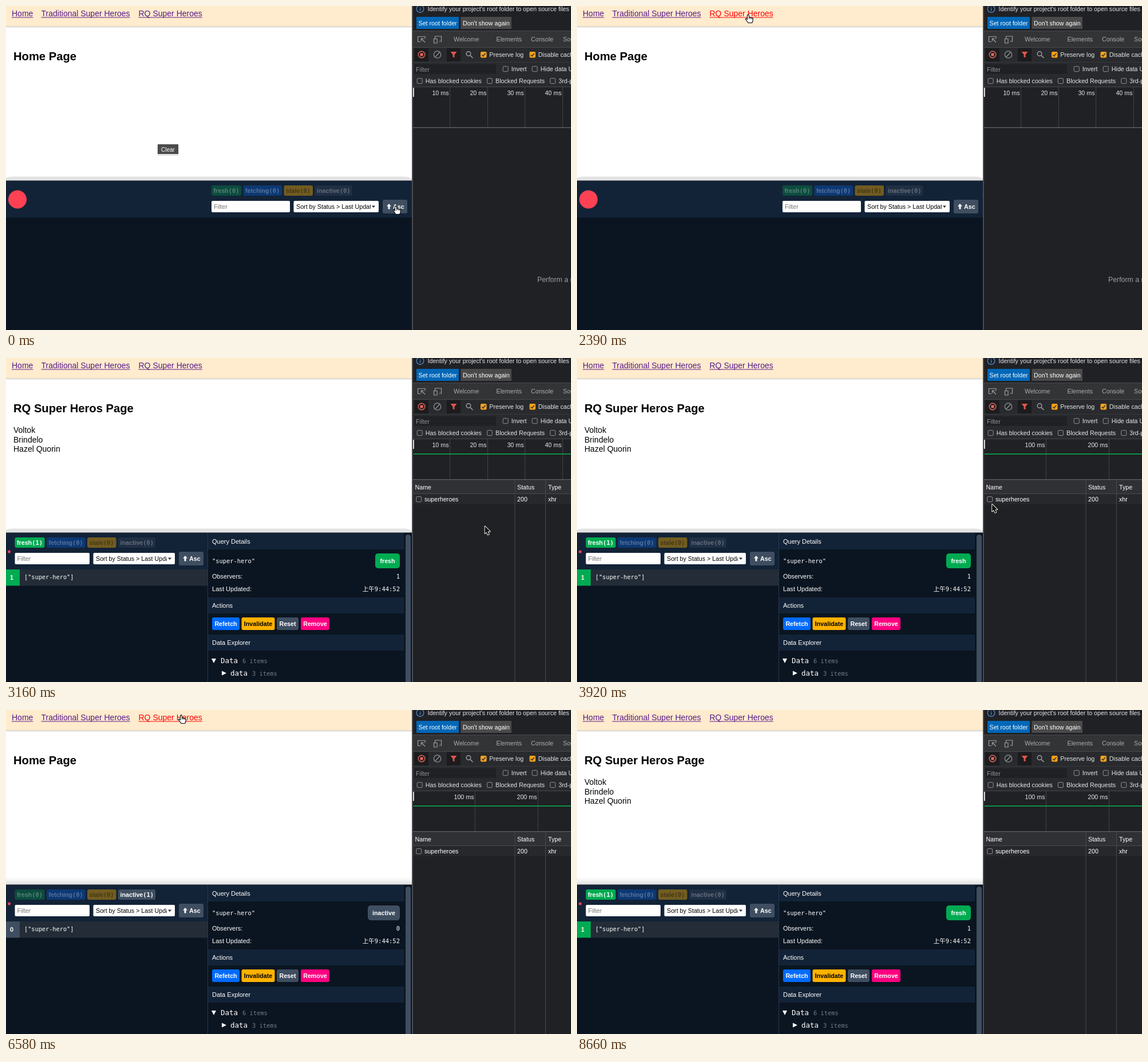
Animation of 987 by 567 pixels, one loop 9 s. Source, as an HTML page with a canvas:

```html
<!DOCTYPE html>
<html lang="en">
<head>
<meta charset="utf-8">
<title>Query cache demo</title>
<style>
html, body { margin: 0; width: 100%; height: 100%; overflow: hidden; background: #fff; }
canvas { display: block; width: 987px; height: 567px; }
</style>
</head>
<body>
<canvas id="stage"></canvas>
<script>
const W = 987, H = 567, LOOP = 9000;
const canvas = document.getElementById('stage');
const ctx = canvas.getContext('2d');
const dpr = window.devicePixelRatio || 1;
canvas.width = W * dpr;
canvas.height = H * dpr;

const SANS = '"Liberation Sans", Arial, sans-serif';
const MONO = '"DejaVu Sans Mono", "Noto Sans CJK TC", "Noto Sans CJK SC", "Noto Sans CJK", monospace';
const C = {
  navy: '#132337', night: '#0b1521', slate: '#3f4e60', green: '#00ab52',
  blue: '#006bff', amber: '#ffb200', pink: '#ff0080', red: '#ff4154',
  link: '#551a8b', base: '#202124', bar: '#292a2d', line: '#47494d', pale: '#e3e5e8', dim: '#9aa0a6'
};
const heroes = ['Voltok', 'Brindelo', 'Hazel Quorin'];

const ARROW = new Path2D('M0 0V12.6L2.8 10L5 14.9L7.2 14L5.1 9.2H9.2Z');
const HAND = new Path2D('M-1.5 1.2Q0 -.9 1.4 1.2L1.6 5Q3 4 4.2 5.4Q5.6 4.8 6.6 6.2Q8.2 5.8 8.4 7.6' +
  'L8.2 10.5L6.8 14.5H0L-2 11.5L-4.6 8.2Q-4.6 6 -2.6 7.4L-1.5 8.4Z');

// Pointer moves: start, end, steps, then the points of the path.
const moves = [
  [80, 170, 2, 781, 417],
  [380, 560, 4, 803, 400, 775, 290, 642, 188],
  [830, 1210, 7, 470, 110, 303, 34],
  [1750, 2100, 7, 306, 33, 299, 15],
  [2540, 2860, 5, 400, 90, 842, 293],
  [3160, 4040, 15, 815, 300, 745, 268, 712, 248],
  [4100, 4280, 4, 750, 190, 791, 197],
  [4520, 4690, 4, 400, 100, 17, 49],
  [4960, 5140, 4, 17, 20],
  [5280, 5340, 2, 19, 17],
  [5730, 6340, 11, 60, 32, 200, 36, 314, 30, 306, 9],
  [6840, 6990, 3, 860, 308],
  [7230, 7950, 12, 879, 314, 735, 252, 721, 257.5, 713, 144, 727, 262],
  [8100, 8330, 4, 936, 527],
  [8540, 8660, 3, 955, 576]
];
const handTimes = [[0, 80], [1980, 2540], [5020, 5790], [6280, 6840]];
const within = (t, a, b) => t >= a && t < b;

function pointer(t) {
  let at = [681, 350];
  for (const [t0, t1, steps, ...xy] of moves) {
    if (t < t0) break;
    const pts = [at];
    for (let i = 0; i < xy.length; i += 2) pts.push([xy[i], xy[i + 1]]);
    const k = Math.min(steps, Math.floor((t - t0) / (t1 - t0) * (steps - 1)) + 1);
    const u = k / steps * (pts.length - 1);
    const i = Math.min(Math.floor(u), pts.length - 2);
    at = [0, 1].map(n => pts[i][n] + (pts[i + 1][n] - pts[i][n]) * (u - i));
  }
  return at;
}

function rect(x, y, w, h, fill, r = 0) {
  ctx.fillStyle = fill;
  if (!r) return ctx.fillRect(x, y, w, h);
  ctx.beginPath();
  ctx.roundRect(x, y, w, h, r);
  ctx.fill();
}

function text(s, x, y, fill = '#fff', size = 10.7, { bold, mono, align = 'left' } = {}) {
  ctx.font = `${bold ? 'bold ' : ''}${size}px ${mono ? MONO : SANS}`;
  ctx.textAlign = align;
  ctx.fillStyle = fill;
  ctx.fillText(s, x, y);
  return ctx.measureText(s).width;
}

function stroke(path, color, width = 1.2) {
  ctx.strokeStyle = color;
  ctx.lineWidth = width;
  ctx.stroke(typeof path === 'string' ? new Path2D(path) : path);
}

function shape(path, fill) {
  ctx.fillStyle = fill;
  ctx.fill(new Path2D(path));
}

function dot(x, y, r, fill) {
  ctx.beginPath();
  ctx.arc(x, y, r, 0, 7);
  ctx.fillStyle = fill;
  ctx.fill();
}

function ring(x, y, r, color, width) {
  const p = new Path2D();
  p.arc(x, y, r, 0, 7);
  stroke(p, color, width);
}

function button(label, x, y, w, h, fill, color = '#fff', r = 3) {
  rect(x, y, w, h, fill, r);
  text(label, x + w / 2, y + h / 2 + 4, color, 10.7, { bold: true, align: 'center' });
}

function clipped(x, y, w, h, draw) {
  ctx.save();
  ctx.beginPath();
  ctx.rect(x, y, w, h);
  ctx.clip();
  draw();
  ctx.restore();
}

function link(label, x, hot) {
  const color = hot ? '#ff0000' : C.link;
  const w = text(label, x, 18, color, 14);
  rect(x, 19.5, w, 1, color);
}

function page(s) {
  rect(0, 0, 709, 306, '#fff');
  rect(0, 0, 709, 36, '#ffebcd');
  rect(0, 35.5, 709, 1.5, '#d6d3d0');
  rect(0, 37, 709, 1, '#f3f3f3');
  link('Home', 10, s.homeHot);
  link('Traditional Super Heroes', 61.5, false);
  link('RQ Super Heroes', 231.5, s.rqHot);
  const title = s.loading ? 'Loading...' : s.list ? 'RQ Super Heros Page' : 'Home Page';
  text(title, 13, 95, '#000', 20.2, { bold: true });
  if (s.list) heroes.forEach((h, i) => text(h, 13, 131 + i * 16.5, '#000', 14));

  if (s.soft) {
    const g = ctx.createLinearGradient(0, 293, 0, 306);
    g.addColorStop(0, '#fff');
    g.addColorStop(1, '#dedede');
    rect(0, 293, 709, 13, g);
  } else {
    shape('M0 301Q4 298.5 12 298.5H697Q705 299 709 303V306H0Z', '#e3e3e3');
  }
  if (s.tip) {
    rect(264, 243, 38, 19, '#e4e4e4', 3);
    rect(265, 242, 36, 17, '#4b4b4b');
    text('Clear', 283, 254.5, '#fff', 10, { align: 'center' });
  }
}

function tag(name, count, x, w, fill, color) {
  ctx.globalAlpha = count ? 1 : name === 'stale' ? 0.4 : 0.3;
  rect(x, 314, w, 18, fill, 3);
  const tw = text(name, x + 3.5, 326.5, color, 10.7, { bold: true });
  text(`(${count})`, x + 3.5 + tw, 326.5, color, 10.4, { bold: true, mono: true });
  ctx.globalAlpha = 1;
}

function toolbar(s) {
  const left = s.open ? 15.5 : 359;
  const is = name => s.status === name ? 1 : 0;
  tag('fresh', is('fresh'), left, 52, C.green, '#fff');
  tag('fetching', is('fetching'), left + 55.5, 67.5, C.blue, '#fff');
  tag('stale', 0, left + 126.5, 50.5, C.amber, '#000');
  tag('inactive', is('inactive'), left + 180.5, 65, C.slate, '#fff');

  const fw = s.open ? 130.5 : 137;
  const sx = s.open ? 152.5 : 502.5, sw = s.open ? 142.5 : 148.5;
  rect(left, 341, fw, 20, '#fff', 2);
  text('Filter', left + 4, 355, '#757575');
  rect(sx, 341, sw, 20, '#fff', 2);
  clipped(sx, 341, sw - 14, 20, () => text('Sort by Status > Last Updated', sx + 4.5, 355, '#000'));
  const ax = sx + sw - 12;
  shape(`M${ax} 349.5h6l-3 3.5z`, '#222');

  const bx = s.open ? 302 : 658;
  rect(bx, 339, 43, 24, C.slate, 3);
  shape(`M${bx + 11} 346l4 4.5h-2.5v5h-3v-5h-2.5z`, '#fff');
  text('Asc', bx + 18, 355, '#fff', 10.7, { bold: true });
}

function details(s) {
  const hue = { fresh: C.green, fetching: C.blue, inactive: C.slate }[s.status];
  const count = s.status === 'inactive' ? '0' : '1';
  const mono = { mono: true }, right = { mono: true, align: 'right' };

  rect(24, 370, 328, 28.5, '#232c37');
  rect(0, 370, 24, 28.5, hue);
  text(count, 10, 388, '#fff', 10.7, { bold: true, align: 'center' });
  text('["super-hero"]', 32, 387, '#fff', 10.25, mono);

  rect(352, 306, 357, 261, C.night);
  rect(352, 306, 1, 261, '#26384d');
  [['Query Details', 306], ['Actions', 419], ['Data Explorer', 484]].forEach(([label, y]) => {
    rect(353, y, 342, y === 306 ? 29 : 28, C.navy);
    text(label, 360, y + (y === 306 ? 19 : 18), '#fff', 11);
  });
  rect(698, 309, 9, 270, C.slate, 4.5);

  text('"super-hero"', 360, 358.5, '#fff', 10.4, mono);
  const bw = s.status === 'fresh' ? 43 : 56;
  button(s.status, 688 - bw, 342, bw, 26, hue, '#fff', 5);
  text('Observers:', 360, 386, '#fff', 10.9);
  text(count, 688, 386, '#fff', 10.4, right);
  text('Last Updated:', 360, 408, '#fff', 11.1);
  text(s.loading ? '上午8:00:00' : '上午9:44:52', 688, 408, '#fff', 10.5, right);

  button('Refetch', 360, 454, 48, 22, C.blue);
  button('Invalidate', 411.5, 454, 58, 22, C.amber, '#000');
  button('Reset', 473, 454, 38, 22, C.slate);
  button('Remove', 515, 454, 50, 22, C.pink);

  if (s.loading) {
    text('Data', 360, 534, '#fff', 12.5, mono);
    return;
  }
  shape('M359 526h8l-4 8z', '#fff');
  text('Data', 375, 534, '#fff', 12.5, mono);
  text('6 items', 413, 534, '#737a82', 10.4, mono);
  shape('M377 547.5l8 4l-8 4z', '#fff');
  text('data', 392, 556, '#fff', 12.5, mono);
  text('3 items', 430, 556, '#737a82', 10.4, mono);
}

function queryPanel(s) {
  rect(0, 305.5, 709, 262, C.night);
  rect(0, 306, 709, 64, C.navy);
  if (s.open) dot(5.5, 339, 2.5, C.red);
  else dot(20, 338.5, 16, C.red);
  toolbar(s);
  if (s.open) details(s);
}

function checkbox(x, y, label, on) {
  if (on) {
    rect(x, y, 10.5, 10.5, '#ffa31a', 2);
    stroke(`M${x + 2.3} ${y + 5.4}l2.2 2.4l3.8 -5`, '#333', 1.5);
  } else {
    ctx.beginPath();
    ctx.roundRect(x + 0.7, y + 0.7, 9, 9, 1.5);
    ctx.strokeStyle = '#8f9296';
    ctx.lineWidth = 1;
    ctx.stroke();
  }
  text(label, x + 15.3, y + 9, C.pale);
}

function devtools(s) {
  rect(709, 0, 278, H, C.base);
  ring(723.5, 5, 6.3, '#4b8fe0', 1.2);
  rect(723, 4, 1.2, 4.5, '#4b8fe0');
  rect(723, 1.5, 1.2, 1.2, '#4b8fe0');
  text("Identify your project's root folder to open source files", 736.5, 8.5, C.pale);
  rect(717, 19, 74, 21, '#0067b8');
  text('Set root folder', 720.5, 34);
  rect(794.5, 19, 88.5, 21, '#4a4a4b');
  text("Don't show again", 798, 34);

  rect(711, 43, 276, 1, C.line);
  rect(711, 44, 276, 28, '#333435');
  stroke('M724 62.5h-4.5v-9h12.5v4', C.dim);
  stroke('M725.5 57l6.5 6.5M725.5 61.5v-4.5h4.5', C.dim);
  stroke('M749.5 57v-4h11v9h-4M747.5 57.5h5.5v7.5h-5.5z', C.dim);
  [['Welcome', 782], ['Elements', 856.5], ['Console', 917], ['Sources', 973]]
    .forEach(([label, x]) => text(label, x, 62, '#a9adb2'));

  rect(711, 72, 276, 70, C.bar);
  rect(711, 72, 276, 1, C.line);
  rect(713, 74, 25, 23, '#1c1c1e');
  rect(770, 74, 24, 23, '#1c1c1e');
  ring(726, 85, 5.8, '#e46962', 1.4);
  rect(723.5, 82.5, 5, 5, '#e46962');
  ring(753.5, 85, 6.2, '#8f9296', 1.3);
  stroke('M749.5 89.5l8.5 -9', '#8f9296', 1.3);
  shape('M776.5 80h11l-4 5v5.5l-3 -1.5v-4z', '#e4554d');
  ring(808, 83.5, 3.8, C.dim, 1.4);
  stroke('M811 86.5l4.5 4.5', C.dim, 1.6);
  checkbox(829, 80, 'Preserve log', true);
  checkbox(914.5, 80, 'Disable cache', true);

  rect(711, 98, 276, 1, '#37393c');
  rect(713, 102, 143, 17, C.base);
  text('Filter', 716, 115, '#8f9296');
  checkbox(867.5, 105, 'Invert');
  checkbox(918.5, 105, 'Hide data URLs');
  checkbox(717.5, 126, 'Has blocked cookies');
  checkbox(839.7, 126, 'Blocked Requests');
  checkbox(950, 126, '3rd-party requests');

  rect(711, 141, 276, 1, C.line);
  rect(711, 142, 276, 71, C.base);
  const gap = s.wide ? 109.8 : 65.5, unit = s.wide ? 100 : 10;
  for (let i = 1; 711 + i * gap < W; i++) {
    const x = Math.round(710.5 + i * gap);
    rect(x - 1, 142, 1, 70, '#414347');
    text(`${i * unit} ms`, x - 2.5, 156, C.pale, 10.7, { align: 'right' });
  }
  if (s.done) rect(712, 167, 275, 2, '#0a9147');
  rect(711, 212, 276, 1.5, '#5a5c60');

  if (s.open) {
    rect(711, 214, 276, 23, '#303134');
    rect(711, 237, 276, 1, C.line);
    rect(711, 238, 276, 18, '#27282b');
    rect(888.5, 214, 1, 353, C.line);
    rect(942, 214, 1, 353, C.line);
    text('Name', 714.5, 229.5);
    text('Status', 893, 229.5);
    text('Type', 947, 229.5);
    checkbox(716, 242, '');
    text('superheroes', 731, 251);
    text(s.done ? '200' : '(pending)', 893, 251);
    text('xhr', 947, 251);
  } else {
    text('Perform a request', 928, 482.5, C.dim, 12.3);
  }
  rect(709, 0, 2, H, '#4b4d51');
  rect(711, 143, 1.8, 16, '#e6e6e6');
}

function cursor(t) {
  const [x, y] = pointer(t);
  const hand = handTimes.some(([a, b]) => within(t, a, b));
  ctx.save();
  ctx.translate(x, y);
  ctx.lineJoin = 'round';
  if (hand) {
    ctx.fillStyle = '#fff';
    ctx.fill(HAND);
    stroke(HAND, '#000', 1.1);
    stroke('M1.6 5v3M4.3 5.5v2.6M6.7 6.3v2', '#000', 0.8);
  } else {
    stroke(ARROW, '#fff', 1.8);
    ctx.fillStyle = '#111';
    ctx.fill(ARROW);
  }
  ctx.restore();
}

function stateAt(t) {
  const open = t >= 2540, loading = within(t, 2540, 3160), home = within(t, 5550, 6640);
  return {
    open, loading,
    done: t >= 3160,
    wide: t >= 3210,
    list: t >= 3160 && !home,
    status: !open ? '' : loading ? 'fetching' : home ? 'inactive' : 'fresh',
    tip: t < 830,
    soft: t >= 5550,
    homeHot: within(t, 5490, 5550),
    rqHot: within(t, 2390, 2540) || within(t, 6580, 6640)
  };
}

function frame() {
  const t = performance.now() % LOOP;
  const s = stateAt(t);
  ctx.setTransform(dpr, 0, 0, dpr, 0, 0);
  page(s);
  queryPanel(s);
  devtools(s);
  cursor(t);
  requestAnimationFrame(frame);
}
frame();
</script>
</body>
</html>
```
